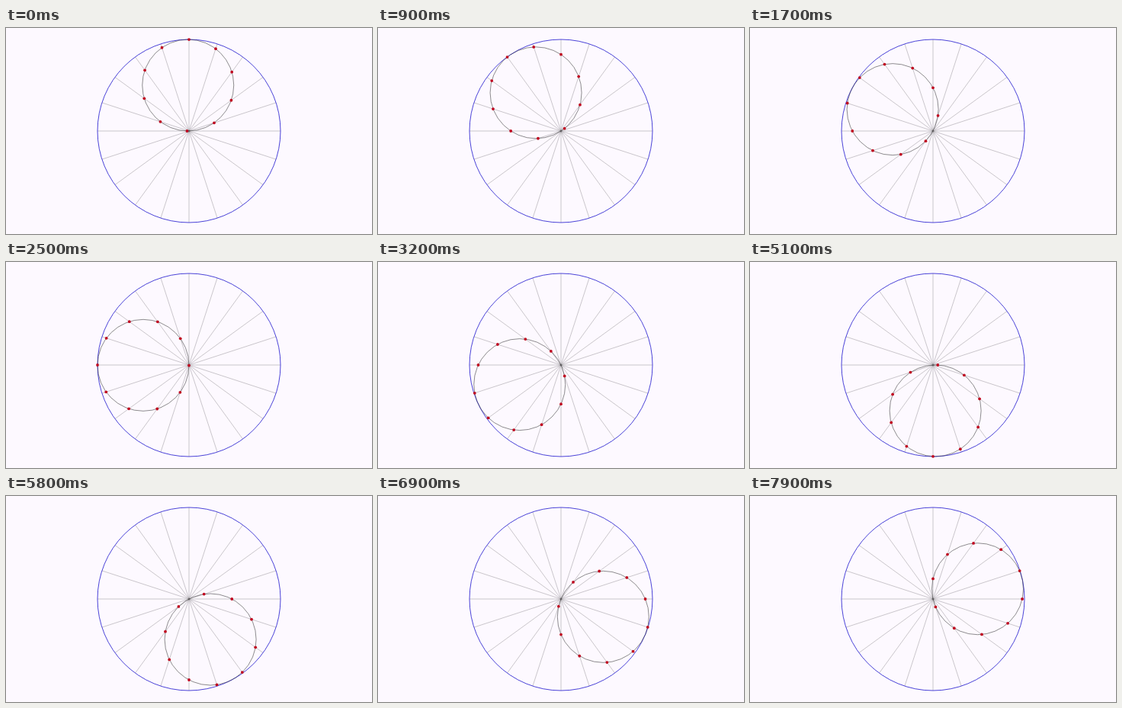
These frames come from a looping animation (480x270 px, 8 s). An HTML page with a canvas:

```html
<!DOCTYPE html>
<html lang="en">
<head>
<meta charset="utf-8">
<title>Rolling circle</title>
<style>
html, body { margin: 0; width: 100%; height: 100%; overflow: hidden; background: #fdf9ff; }
canvas { display: block; }
</style>
</head>
<body>
<canvas id="stage" width="480" height="270"></canvas>
<script>
const ctx = document.getElementById('stage').getContext('2d');
const CX = 240, CY = 135, R = 120;
const COUNT = 10;
const LOOP = 8000, STEP = 100;
const TURN = 2 * Math.PI / 101;
const START = 91.2 * Math.PI / 180;

// Polar to stage coordinates, angles counter-clockwise
const polar = (r, a) => [CX + r * Math.cos(a), CY - r * Math.sin(a)];

function ring(x, y, r, color, width) {
  ctx.beginPath();
  ctx.arc(x, y, r, 0, 2 * Math.PI);
  ctx.strokeStyle = color;
  ctx.lineWidth = width;
  ctx.stroke();
}

function dot(x, y) {
  ctx.beginPath();
  ctx.arc(x, y, 1.9, 0, 2 * Math.PI);
  ctx.fillStyle = '#c00820';
  ctx.fill();
}

function draw(ms) {
  const phi = START + Math.floor(ms % LOOP / STEP) * TURN;
  const axes = Array.from({ length: COUNT }, (_, i) => i * Math.PI / COUNT);

  ctx.fillStyle = '#fdf9ff';
  ctx.fillRect(0, 0, 480, 270);

  ctx.strokeStyle = '#504c50';
  ctx.lineWidth = 0.3;
  for (const a of axes) {
    ctx.beginPath();
    ctx.moveTo(...polar(R, a));
    ctx.lineTo(...polar(-R, a));
    ctx.stroke();
  }

  ring(CX, CY, R, '#2a22d0', 0.85);
  ring(...polar(R / 2, phi), R / 2, '#303030', 0.55);

  // Each point slides along its own diameter
  for (const a of axes) dot(...polar(R * Math.cos(phi - a), a));
}

const begin = performance.now();
function tick() {
  draw(performance.now() - begin);
  requestAnimationFrame(tick);
}
tick();
</script>
</body>
</html>
```
